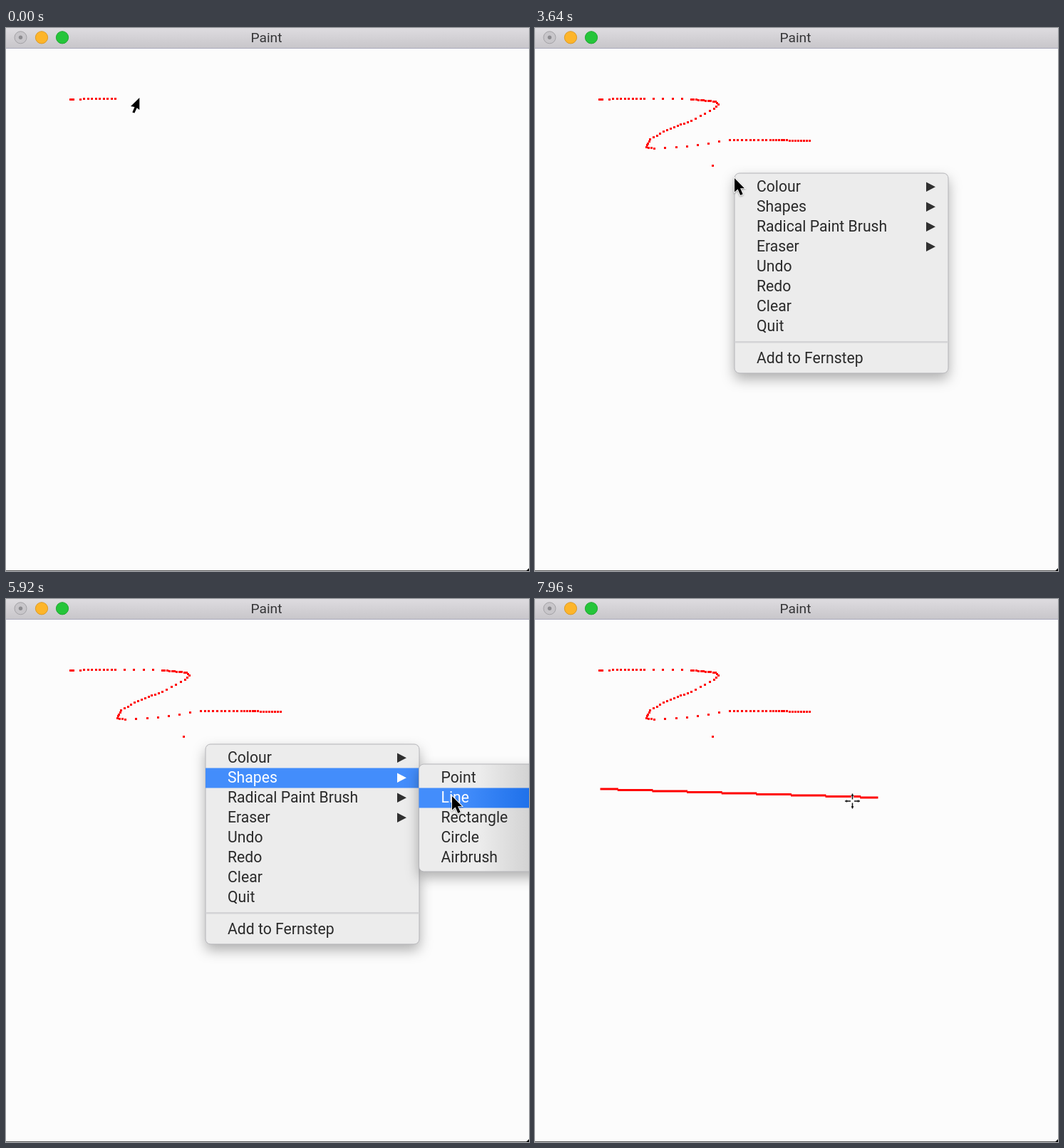
These frames come from a looping animation (734x763 px, 8 s). An HTML page:

```html
<!DOCTYPE html>
<html lang="en">
<head>
<meta charset="utf-8">
<title>Paint</title>
<style>
  html, body { margin: 0; width: 100%; height: 100%; overflow: hidden; background: #fcfcfc; }
  svg { display: block; width: 734px; height: 763px; }
  text { font: 21.2px Roboto, Inter, sans-serif; fill: #2a2a2a; }
  .title { font-size: 19.2px; fill: #363638; text-anchor: middle; }
  .arrow { fill: #303030; }
  .bar { visibility: hidden; }
  .on .bar { visibility: visible; }
  .on text, .on .arrow { fill: #fff; }
  .panel { stroke: #b4b4b8; filter: drop-shadow(0 8px 9px rgba(0, 0, 0, .3)); }
  #pointer { filter: drop-shadow(0 1px 1px rgba(0, 0, 0, .35)); }
</style>
</head>
<body>
<svg viewBox="0 0 734 763" xmlns="http://www.w3.org/2000/svg">
  <defs>
    <linearGradient id="chrome" x2="0" y2="1">
      <stop stop-color="#dedce0"/><stop offset="1" stop-color="#c8c6ca"/>
    </linearGradient>
    <linearGradient id="fade" gradientUnits="userSpaceOnUse" x1="665" x2="734">
      <stop stop-color="#ececec"/><stop offset="1" stop-color="#d3d3d3"/>
    </linearGradient>
    <linearGradient id="blue" gradientUnits="userSpaceOnUse" x1="640" x2="734">
      <stop stop-color="#438dfb"/><stop offset="1" stop-color="#1f71ea"/>
    </linearGradient>
  </defs>
  <rect width="734" height="763" fill="#fcfcfc"/>
  <rect width="734" height="28" fill="url(#chrome)"/>
  <rect y="28" width="734" height="1" fill="#a9a9bb"/>
  <circle cx="20.5" cy="13.3" r="8.5" fill="#c8c6ca" stroke="#a3a2a6"/>
  <circle cx="20.5" cy="13.3" r="2.7" fill="#8d8c90"/>
  <circle cx="50" cy="13.3" r="8.6" fill="#fdb52a" stroke="#dc9a25"/>
  <circle cx="79" cy="13.3" r="8.6" fill="#25c53a" stroke="#1fa730"/>
  <text class="title" x="365.5" y="20.4">Paint</text>
  <rect y="762" width="734" height="1" fill="#555"/>
  <path d="M734 759v4h-4z"/>
  <g id="ink" fill="#f00"></g>
  <g id="menus">
    <g id="main"></g>
    <g id="sub"></g>
  </g>
  <path id="brush" d="M0-1V16L-3.6 13.2-7 20.5-10 19.5-6.8 12-12.3 11z"/>
  <path id="pointer" d="M1 2v19.5l4.6-4.1 3.7 8.6 3.4-1.5-3.6-8.3H15z" stroke="#fff" stroke-width="1.8" paint-order="stroke"/>
  <g id="cross">
    <path d="M-10 0H-2M2 0H10M0-10V-2M0 2V10" stroke="#fff" stroke-width="3.5"/>
    <path d="M-10.5 0H-2.5M2.5 0H10.5M0-10.5V-2.5M0 2.5V10.5" stroke="#111" stroke-width="1.5"/>
    <path d="M-8-1.6V1.6M8-1.6V1.6M-1.6-8H1.6M-1.6 8H1.6" stroke="#111" stroke-width="1.4"/>
  </g>
</svg>
<script>
const LOOP = 8000, STEP = 40, ROW = 28;
const $ = id => document.getElementById(id);

function add(parent, tag, attrs, text = '') {
  const el = document.createElementNS('http://www.w3.org/2000/svg', tag);
  for (const key in attrs) el.setAttribute(key, attrs[key]);
  el.textContent = text;
  return parent.appendChild(el);
}
const show = (el, on) => el.setAttribute('visibility', on ? 'visible' : 'hidden');
const place = (el, [x, y]) => el.setAttribute('transform', `translate(${x} ${y})`);

const linear = p => p;
const smooth = p => p * p * (3 - 2 * p);

// Each key is [time, x, y]
function at(keys, t, ease = smooth) {
  const i = keys.findIndex(k => k[0] > t);
  if (i === 0) return keys[0].slice(1);
  if (i < 0) return keys[keys.length - 1].slice(1);
  const a = keys[i - 1], b = keys[i], p = ease((t - a[0]) / (b[0] - a[0]));
  return a.slice(1).map((v, j) => v + (b[j + 1] - v) * p);
}

// The brush leaves one dot per beat; the corners of its path are keyed by beat
const DOTS = 87, FIRST = 13, BEAT = 23.9, LEAD = 1.6;
const stroke = [
  [0, 89.5, 99.5], [2, 93.5, 99.5], [3, 104, 99.5], [12, 153, 98.5], [17, 219, 99.5],
  [27, 253, 103], [29, 257, 107], [31, 251, 113], [36, 219, 130], [43, 185, 142.5],
  [48, 161, 156], [52, 155.5, 167], [55, 167, 168.5], [58, 213, 166],
  [62, 273, 157], [72, 330, 157], [86, 384.5, 158]
];
const brushAt = beat => at(stroke, beat, linear);
const dot = ([x, y]) => add($('ink'), 'rect',
  { x: Math.round(x) - 1, y: Math.round(y) - 1, width: 3, height: 3 });
const dots = Array.from({ length: DOTS }, (_, i) => dot(brushAt(i)));
const lastDot = dot([249, 193]);
const line = add($('ink'), 'path', {});

const brushMove = [[1880, 384.5, 158], [2320, 249.5, 193], [2880, 249.5, 193], [3240, 279, 210]];
const pointerMove = [
  [4000, 279, 209], [4840, 349, 237], [5080, 349, 237], [5500, 590, 255], [5880, 625, 275]
];
const crossMove = [
  [6320, 625, 275], [6800, 93, 266], [7040, 93, 266], [7400, 385, 288],
  [7640, 481, 279], [7840, 481, 279], [7960, 445.5, 284]
];

function addItem(menu, x, y, label, arrow, fill) {
  const g = add(menu, 'g', {});
  add(g, 'rect', { class: 'bar', x, y, width: 300, height: ROW, fill });
  add(g, 'text', { x: x + 31, y: y + 20.5 }, label);
  if (arrow) add(g, 'path', { class: 'arrow', d: `M${x + 269} ${y + 7}l13 6.7-13 6.7z` });
  return g;
}
function addMenu(menu, x, y, height, fill, bar, labels, arrows) {
  add(menu, 'rect', { class: 'panel', x, y, width: 300, height, rx: 7, fill });
  return labels.map((s, i) => addItem(menu, x, y + 5.5 + i * ROW, s, i < arrows, bar));
}
const items = addMenu($('main'), 280, 204, 281, '#ececec', '#438dfb',
  ['Colour', 'Shapes', 'Radical Paint Brush', 'Eraser', 'Undo', 'Redo', 'Clear', 'Quit'], 4);
add($('main'), 'rect', { x: 280.5, y: 440, width: 299, height: 2.5, fill: '#d4d4d6' });
addItem($('main'), 280, 450, 'Add to Fernstep');
const subItems = addMenu($('sub'), 579.5, 232, 151, 'url(#fade)', 'url(#blue)',
  ['Point', 'Line', 'Rectangle', 'Circle', 'Airbrush'], 0);
const mark = (list, row) => list.forEach((el, i) => el.setAttribute('class', i === row ? 'on' : ''));

// The line is a staircase with one level per 1.5 px of height
function stairs(x0, y0, x1, y1) {
  const n = Math.max(0, Math.round((y1 - y0) / 1.5)), w = (x1 - x0) / Math.max(1, n);
  let d = '';
  for (let k = 0; k <= n; k++) {
    const a = Math.max(x0, x0 + (k - .5) * w);
    const b = k < n ? x0 + (k + .5) * w : x1;
    d += `M${a} ${y0 + k * 1.5 - 1.5}H${b + 1}v3H${a}z`;
  }
  return d;
}

function draw(t) {
  const beat = Math.min(DOTS, FIRST + t / BEAT);
  dots.forEach((el, i) => show(el, i < Math.floor(beat)));
  show(lastDot, t >= 2480);

  show($('brush'), t < 3600);
  place($('brush'), beat < DOTS ? brushAt(beat + LEAD) : at(brushMove, t));

  const [px, py] = at(pointerMove, t), inSub = px > 580;
  show($('pointer'), t >= 3600 && t < 6320);
  place($('pointer'), [px, py]);

  const open = t >= 3600 && t < 6360;
  show($('main'), open);
  show($('sub'), open && t >= 4680);
  $('menus').setAttribute('opacity', Math.min(1, Math.max(0, (6360 - t) / 160)));
  mark(items, inSub ? 1 : px > 280 ? Math.floor((py - 209) / ROW) : -1);
  const blink = t >= 6120 && t < 6160;
  mark(subItems, inSub && !blink ? Math.floor((py - 237.5) / ROW) : -1);

  show($('cross'), t >= 6320);
  place($('cross'), at(crossMove, t));
  show(line, t >= 7040);
  const [ex, ey] = at(crossMove, Math.min(t, 7640));
  line.setAttribute('d', stairs(91.5, 267, Math.max(92, ex - .5), ey));
}

const start = performance.now();
function tick() {
  const t = Math.max(0, performance.now() - start) % LOOP;
  draw(Math.floor(t / STEP) * STEP);
  requestAnimationFrame(tick);
}
tick();
</script>
</body>
</html>
```
